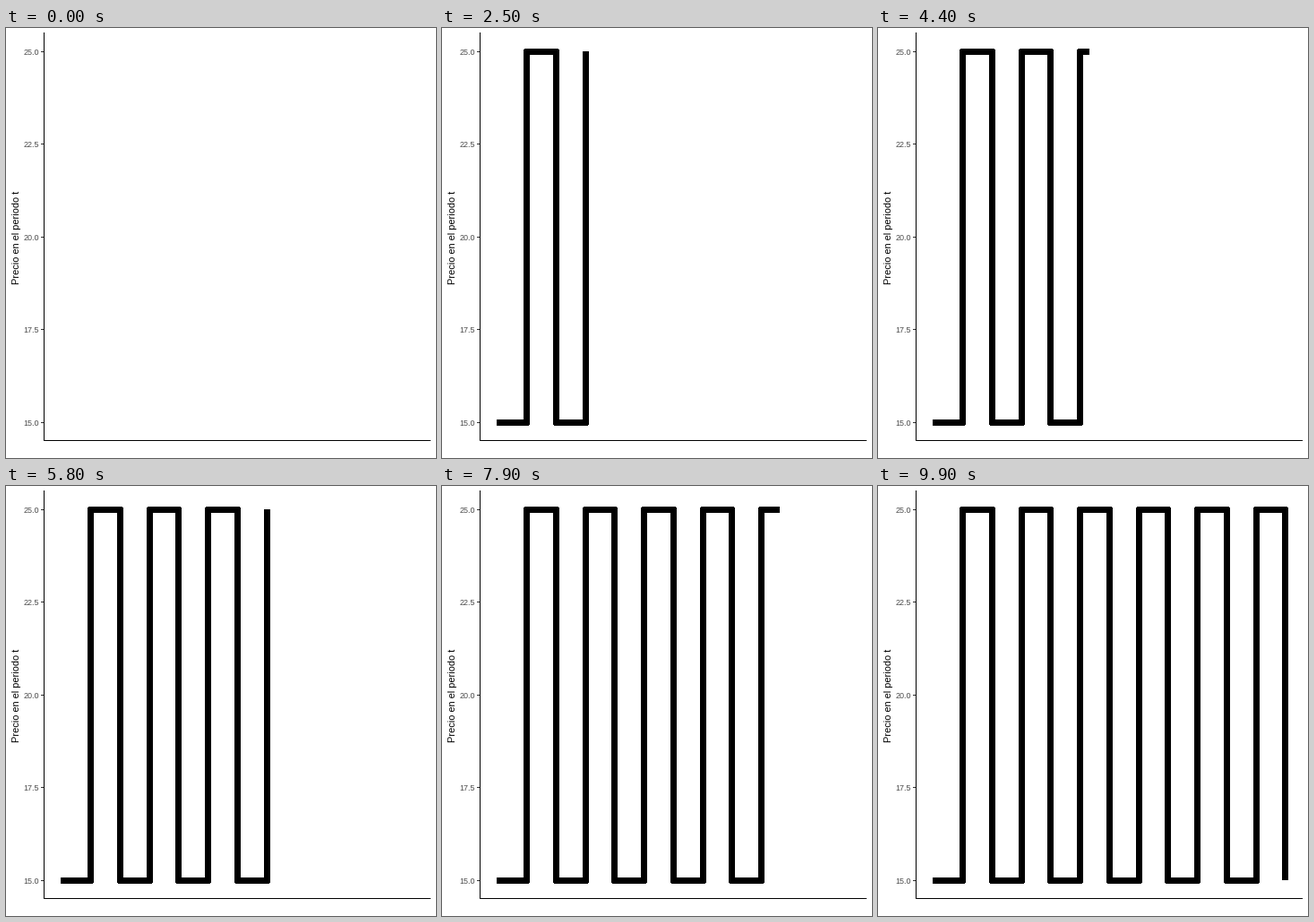
Recreate the animation shown at these times as a matplotlib script. Size 480x480 px, loop 10000 ms.

```python
import matplotlib.pyplot as plt
from matplotlib.animation import FuncAnimation
from matplotlib.patches import Rectangle

SIZE = 480
FRAMES = 100
STEPS = 12
X0, DX = 61.4, 32.75
LOW, HIGH = 440, 26

plt.rcParams["font.family"] = "Liberation Sans"
plt.rcParams["path.simplify"] = False

fig = plt.figure(figsize=(SIZE / 72, SIZE / 72), dpi=72, facecolor="white")
ax = fig.add_axes([0, 0, 1, 1])
ax.set(xlim=(0, SIZE), ylim=(SIZE, 0))
ax.axis("off")


def bar(x, y, w, h, color):
    ax.add_patch(Rectangle((x, y), w, h, fc=color, lw=0, antialiased=False))


# Axes, ticks and labels
bar(42, 5, 1, 456, "black")
bar(42, 460, 432, 1, "black")
for i in range(5):
    y = int(LOW + (HIGH - LOW) * i / 4)
    bar(39, y, 3, 1, "#333333")
    ax.text(37.3, y + 4, f"{15 + 2.5 * i:.1f}", size=9, color="#4d4d4d",
            ha="right", va="baseline")
ax.text(15, 233.5, "Precio en el periodo t", size=11, color="black",
        rotation=90, rotation_mode="anchor", ha="center", va="baseline")

line, = ax.plot([], [], color="black", lw=7, antialiased=False, snap=False,
                solid_capstyle="butt", solid_joinstyle="round")

# Each price change falls on a whole frame
keys = [round((FRAMES - 1) * k / STEPS) for k in range(STEPS + 1)]


def level(k):
    return HIGH if k % 2 else LOW


def step_path(frame):
    """Square wave up to the given frame; the riser appears all at once."""
    if frame == 0:
        return [], []
    done = sum(key <= frame for key in keys) - 1
    xs, ys = [61], [LOW + 0.5]
    for k in range(1, done + 1):
        x = round(X0 + DX * k) + 0.5
        xs += [x, x]
        ys += [level(k - 1) + 0.5, level(k) + 0.5]
    if keys[done] == frame:
        ys[-1] = level(done)
    else:
        part = (frame - keys[done]) / (keys[done + 1] - keys[done])
        xs.append(round(X0 + DX * (done + part)))
        ys.append(level(done) + 0.5)
    return xs, ys


def update(frame):
    line.set_data(*step_path(frame))
    return line,


anim = FuncAnimation(fig, update, frames=FRAMES, interval=100,
                     repeat=True, repeat_delay=0, blit=False)
plt.show()
```
